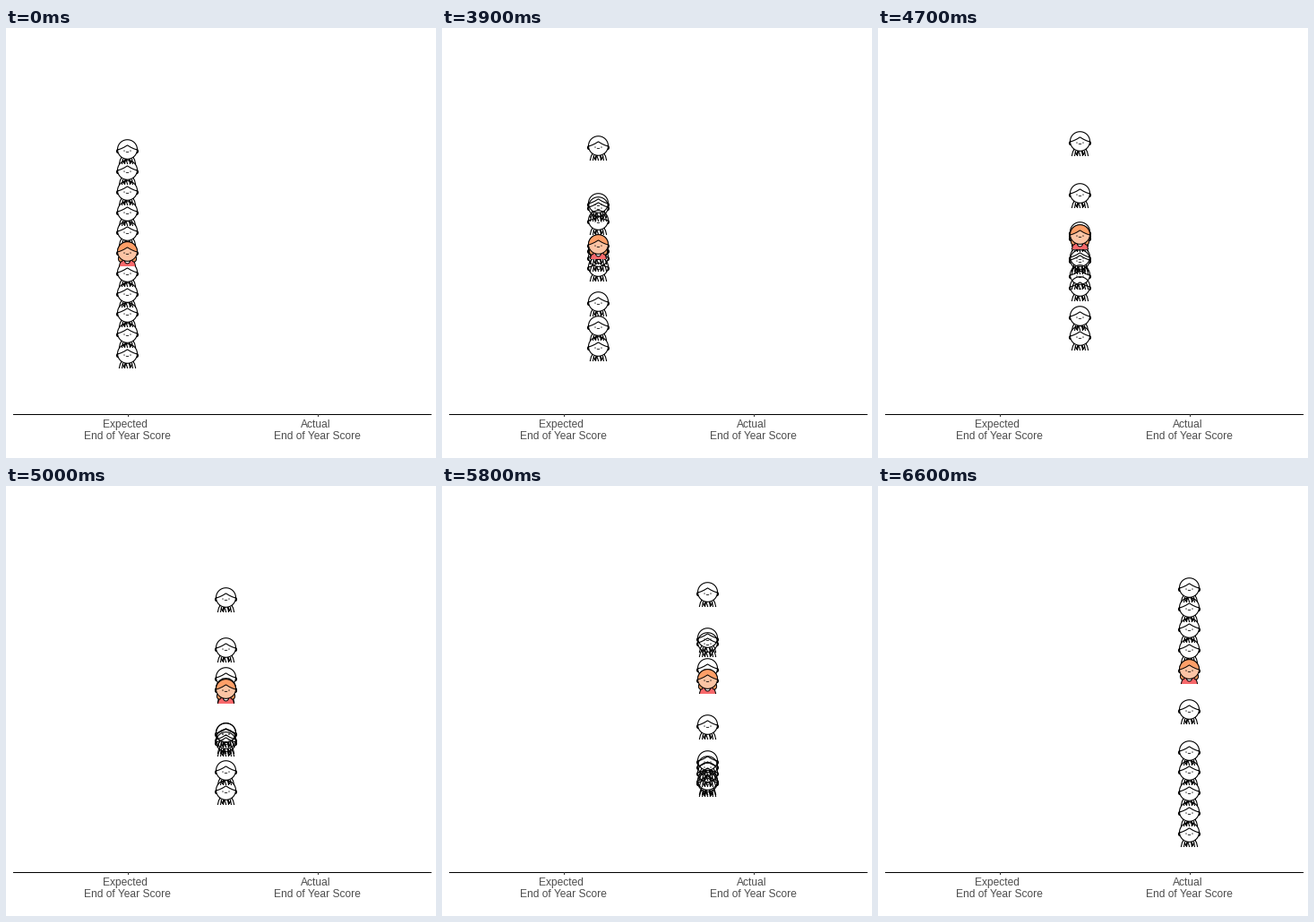
Write a matplotlib script that moves like this. It is 480 px wide and 480 px high and loops after 10 s.

```python
import numpy as np
import matplotlib.pyplot as plt
from matplotlib.animation import FuncAnimation
from matplotlib.transforms import Affine2D

SIZE, DPI = 480, 100
PX = 72 / DPI                    # one pixel in points
STEPS, HOLD = 33, 33             # moving steps, still frames before them
X_START, X_END = 135.3, 347.4
Y_TOP, SLOT = 135.3, 22.75
END_SLOT = [-1, 11, 10, 1, 9, 3, 2, 0, 5, 7, 8]
HERO = 5

plt.rcParams["font.family"] = "Liberation Sans"
fig = plt.figure(figsize=(SIZE / DPI, SIZE / DPI), dpi=DPI, facecolor="white")
ax = fig.add_axes([0, 0, 1, 1])
ax.set(xlim=(0, SIZE), ylim=(SIZE, 0))
ax.axis("off")


def arc(cx, cy, rx, ry, start, stop, n=40):
    t = np.radians(np.linspace(start, stop, n))
    return np.column_stack([cx + rx * np.cos(t), cy + ry * np.sin(t)])


def mirror(points):
    return np.asarray(points, float) * [-1, 1]


def both(points):
    return [np.asarray(points, float), mirror(points)]


HEAD = arc(0, 0, 11, 10.8, 0, 360)
FRINGE = np.array([(-11.2, 0.6), (-7.5, -0.6), (-4, -2.2), (0, -4.6),
                   (4, -2.2), (7.5, -0.6), (11.2, 0.6)])
HAIR = np.vstack([arc(0, 0, 11, 10.8, 180, 360), FRINGE[::-1]])
EAR = arc(10.6, 2, 1.4, 2, -90, 90, 12)
EYE = [(3.5, 0.8), (3.5, 2.4)]
MOUTH = [(-1.6, 2.6), (-0.6, 3), (0.6, 3), (1.6, 2.6)]
BRAID = arc(7.5, 8, 2.6, 3.6, 0, 360, 24)
DRESS = np.array([(-5.5, 9), (5.5, 9), (7.8, 11.5), (9.2, 16.5),
                  (-9.2, 16.5), (-7.8, 11.5)])
COLLAR = arc(0, 10.4, 3, 3, 0, 180, 20)

BODY = (both([(6.5, 9), (8, 11.5), (9.2, 16.5)])
        + both([(5, 10.5), (6, 16.5)])
        + both([(2.2, 11), (3, 16.5)])
        + both([(5, 12), (3.8, 15), (2.2, 11)])
        + [np.array([(-1.8, 11), (-0.5, 14), (0.2, 16.5)])])
FACE = both(EYE) + [np.array(MOUTH)]


def stroke(parts, transform, z, color="black", width=1.0):
    gap = [[np.nan, np.nan]]
    pts = np.vstack([row for part in parts for row in (part, gap)])
    ax.plot(*pts.T, color=color, lw=width * PX, transform=transform, zorder=z,
            solid_capstyle="butt")


def fill(points, color, transform, z, edge="black"):
    ax.fill(*np.asarray(points).T, fc=color, ec=edge, lw=PX,
            transform=transform, zorder=z)


def draw_plain(transform):
    stroke([HEAD, FRINGE, *both(EAR), *BODY], transform, 2, width=1.1)
    stroke(FACE, transform, 2, width=0.8)


def draw_hero(transform):
    fill(DRESS, "#f8696b", transform, 3, edge="none")
    stroke([DRESS[[1, 2, 3]], DRESS[[0, 5, 4]]], transform, 3)
    fill(COLLAR, "white", transform, 4)
    for braid in both(BRAID):
        fill(braid, "#e8935c", transform, 4)
    for ear in both(EAR):
        fill(ear, "#fcc4a4", transform, 5)
    fill(HEAD, "#fcc4a4", transform, 6)
    fill(HAIR, "#ff9f68", transform, 7)
    stroke(FACE, transform, 8, width=0.8)


def draw_axis():
    ax.plot([8, 474], [430.5, 430.5], color="black", lw=PX, zorder=1)
    for x in (135, 347):
        ax.plot([x + 0.5] * 2, [431, 433], color="#333333", lw=PX, zorder=1)
    style = dict(color="#4d4d4d", fontsize=12 * PX, ha="center", va="baseline")
    for x, word in ((135, "Expected"), (347, "Actual")):
        ax.text(x - 1.7, 446, word, **style)
        ax.text(x + 0.2, 459, "End of Year Score", **style)


draw_axis()
offsets = [Affine2D() for _ in END_SLOT]
for i, offset in enumerate(offsets):
    draw = draw_hero if i == HERO else draw_plain
    draw(offset + ax.transData)


def update(frame):
    p = np.clip(frame - HOLD, 0, STEPS) / STEPS
    x = round(X_START + (X_END - X_START) * p)
    for i, (offset, end) in enumerate(zip(offsets, END_SLOT)):
        y = round(Y_TOP + SLOT * (i + (end - i) * p))
        offset.clear().translate(x + 0.5, y + 0.5)
    return []


anim = FuncAnimation(fig, update, frames=100, interval=100, repeat=True,
                     repeat_delay=0, init_func=lambda: update(0))
plt.show()
```
